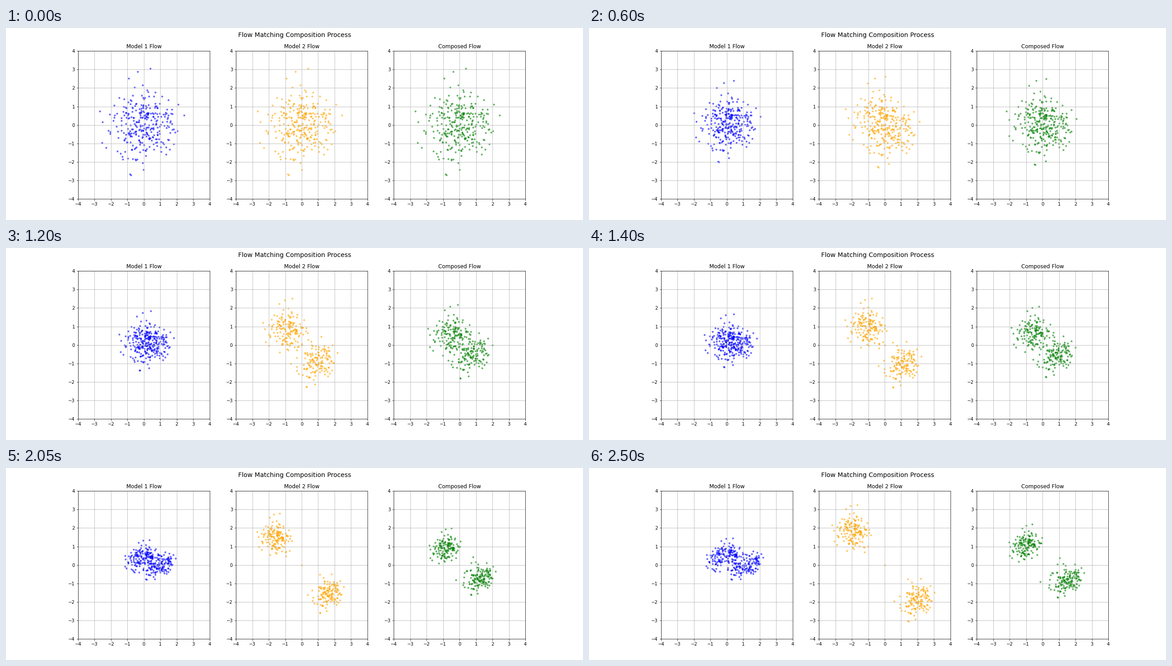
Write a matplotlib script that moves like this. It is 1280 by 427 pixels and loops after 2550 ms.

```python
import numpy as np
import matplotlib.pyplot as plt
from matplotlib.animation import FuncAnimation

STEPS = 50
COUNT = 300
DPI = 72

# A few far-out start positions; all others are sampled.
OUTLIERS = [(.38, 3.06), (-.38, 2.89), (-.93, 2.53), (-.85, -2.67),
            (-.8, -2.7), (-2.69, .74), (-2.52, .15), (-2.55, -.95),
            (-2.31, -1.23), (2.43, .53), (2.08, 1.12), (0, 0)]


def start_points():
    rng = np.random.default_rng(3)
    pts = rng.normal(size=(2 * COUNT, 2))
    inside = np.hypot(pts[:, 0] / 2.2, pts[:, 1] / 2.3) < 1
    core = pts[inside][:COUNT - len(OUTLIERS)]
    return np.vstack([OUTLIERS, core - core.mean(0)])


def mixture_flow(centers, spread):
    """Velocity field carrying a unit Gaussian to a Gaussian mixture."""
    def velocity(x, t):
        var = (1 - t) ** 2 + (t * spread) ** 2
        diff = x[:, None] - t * centers
        logw = -(diff ** 2).sum(-1) / (2 * var)
        w = np.exp(logw - logw.max(1, keepdims=True))
        w /= w.sum(1, keepdims=True)
        rate = (t * spread ** 2 - (1 - t)) / var
        return (w[..., None] * (centers + rate * diff)).sum(1)
    return velocity


def integrate(velocity, x):
    path = [x]
    for k in range(STEPS):
        path.append(path[-1] + velocity(path[-1], k / STEPS) / STEPS)
    return path


arc = np.linspace(.2 * np.pi, np.pi, 10)
cos, sin = .78 * np.cos(arc), .78 * np.sin(arc)
moons = np.vstack([np.c_[cos, sin], np.c_[1 - cos, .5 - sin]])
blobs = np.array([(-2, 1.9), (2, -1.9)])

flow1 = mixture_flow(moons, .28)
flow2 = mixture_flow(blobs, .5)


def composed(x, t):
    return (flow1(x, t) + flow2(x, t)) / 2


PANELS = [
    ("Model 1 Flow", "blue", flow1),
    ("Model 2 Flow", "orange", flow2),
    ("Composed Flow", "green", composed),
]

fig, axes = plt.subplots(1, 3, figsize=(1280 / DPI, 427 / DPI), dpi=DPI)
fig.suptitle("Flow Matching Composition Process", fontsize=14)

start = start_points()
paths, dots = [], []
for ax, (title, color, flow) in zip(axes, PANELS):
    ax.set(title=title, xlim=(-4, 4), ylim=(-4, 4),
           xticks=range(-4, 5), yticks=range(-4, 5))
    ax.grid(True)
    paths.append(integrate(flow, start))
    dots.append(ax.scatter(*start.T, s=10, color=color, alpha=.5))


def update(k):
    for dot, path in zip(dots, paths):
        dot.set_offsets(path[k])
    return dots


anim = FuncAnimation(fig, update, frames=STEPS + 1, interval=50,
                     repeat=True, repeat_delay=0)
plt.show()
```
